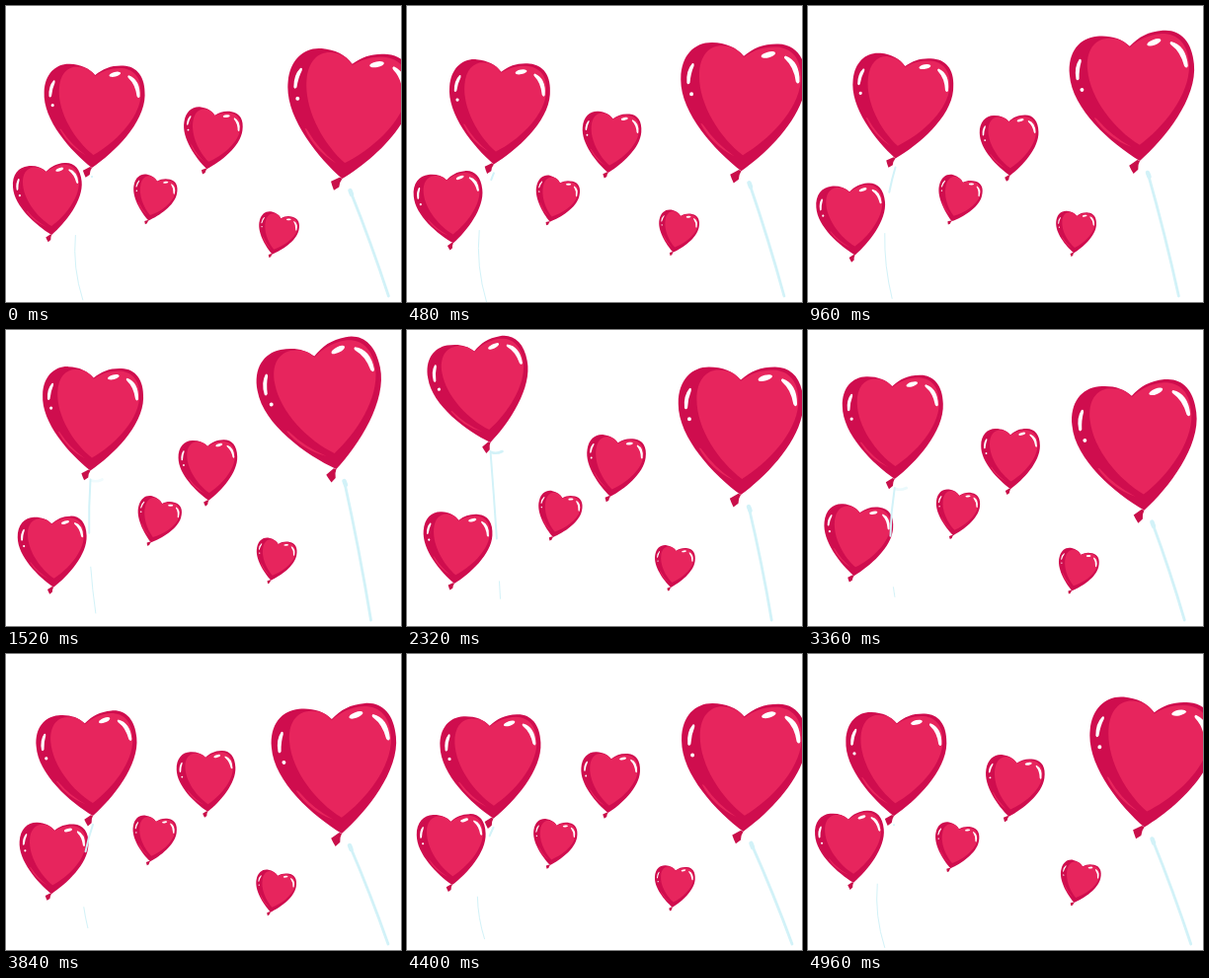
Recreate the animation shown at these times as an HTML page. Size 400 by 300 pixels, loop 5000 ms.

```html
<!DOCTYPE html>
<html lang="en">
<head>
<meta charset="utf-8">
<title>Heart balloons</title>
<style>
html, body { margin: 0; width: 100%; height: 100%; overflow: hidden; background: #fff; }
svg { display: block; width: 400px; height: 300px; }
.string { fill: none; stroke: #d2f2f8; stroke-linecap: round; }
</style>
</head>
<body>
<svg id="stage" viewBox="0 0 400 300">
  <defs>
    <g id="heart">
      <path fill="#c90f4a" d="M-2 -1L-9 3Q-8 6 -6 10L-2 7Q-2 3 0 0Z"/>
      <path fill="#cf0d4e" d="M0 0C-22 -16 -51.5 -47 -51 -75C-51 -94 -40 -104.5 -26 -104.5C-15 -104.5 -6 -101 0 -94C8 -101 16 -104.5 28 -104.5C42 -104.5 51 -94 51 -75C51.5 -47 22 -16 0 0Z"/>
      <path fill="#e7255d" d="M1 -13C-18 -27 -36 -54 -36 -78C-36 -94 -28 -102 -18 -102C-10 -102 -4 -99 0 -93C8 -99 16 -102 27 -102C40 -101 48 -92 47 -74C45 -50 22 -26 1 -13Z"/>
      <path fill="#e7255d" d="M-34 -38Q-25 -21 -6 -12Q-22 -23 -31 -36Q-33 -39 -34 -38Z"/>
      <g fill="#fff">
        <ellipse cx="20" cy="-95.5" rx="6" ry="2.3" transform="rotate(-16 20 -95.5)"/>
        <path d="M34 -95Q46 -91 46 -74Q45 -71 43 -74Q41 -86 34 -92Q32 -94 34 -95Z"/>
        <path d="M-42 -87Q-47 -81 -46 -71Q-45 -69 -43.5 -71Q-43 -79 -40.5 -85Q-40 -88 -42 -87Z"/>
        <circle cx="-42" cy="-62" r="1.6"/>
      </g>
    </g>
  </defs>
</svg>
<script>
const LOOP = 5000;

// Sine wave over the loop: mean, swing, peak in degrees, cycles per loop
const wave = (mean, swing, peak, cycles = 1) => t =>
  mean + swing * Math.cos((cycles * t / LOOP * 360 - peak) * Math.PI / 180);

// Smooth closed path through key points [ms, x, y, tilt]
function path(...keys) {
  const n = keys.length;
  const key = i => {
    const [ms, ...pose] = keys[(i + n) % n];
    return { ms: ms + LOOP * Math.floor(i / n), pose };
  };
  return t => {
    let i = n - 1;
    while (keys[i][0] > t) i--;
    const [p, a, b, q] = [i - 1, i, i + 1, i + 2].map(key);
    const span = b.ms - a.ms, u = (t - a.ms) / span;
    return a.pose.map((from, k) => {
      const step = b.pose[k] - from;
      const m0 = (b.pose[k] - p.pose[k]) / (b.ms - p.ms) * span;
      const m1 = (q.pose[k] - from) / (q.ms - a.ms) * span;
      return from + u * (m0 + u * (3 * step - 2 * m0 - m1 + u * (m0 + m1 - 2 * step)));
    });
  };
}

// Gentle drift: one wave each for x, y and tilt
const bob = (...waves) => t => waves.map(w => w(t));

const leftPath = path([0, 87, 164, 2], [960, 88.5, 154.5, 6], [1520, 85.5, 142.5, 2],
  [2320, 84.5, 114, -10], [2920, 87, 135, 1], [3840, 88, 164, -5]);
const rightPath = path([0, 340.5, 175, 5], [960, 336, 157, -5], [1520, 334.5, 141, -11],
  [2320, 338, 167, 0], [2920, 340.5, 180.5, -5.5], [3840, 340, 182, -5]);

const BALLOONS = [
  { size: 1, pose: leftPath },
  { size: 1.24, pose: rightPath },
  { size: .685, pose: bob(wave(47, 1.2, 130), t => wave(247.5, 13.5, 150)(t) - wave(0, 3.8, 0, 2)(t), wave(0, 6, 215)) },
  { size: .585, pose: bob(wave(204.7, 1.3, 170), wave(166.3, 6.5, 100), wave(3, 5.5, 0, 2)) },
  { size: .435, pose: bob(wave(146.2, 1.8, 180), wave(213.3, 5.5, 40), wave(12.3, 4, 90)) },
  { size: .4, pose: bob(wave(268.3, 1.4, 20), wave(257, 7.5, 225), wave(9.5, 5, 37, 3)) }
];

// Loose ends of the strings
const rightEnd = wave(379, 11, -40);
const leftMid = wave(80, 10, 172);
const leftEnd = bob(wave(86, 8.5, 165), wave(284, 16, 30));
// The left string shows only its upper share and its tail
const upperShare = wave(.3, .3, 180);
const tailStart = wave(.7, .25, 210);
const curlFade = wave(0, 1, 180);

const stage = document.getElementById('stage');

function set(el, attrs) {
  for (const name in attrs) el.setAttribute(name, attrs[name]);
}

function add(tag, attrs) {
  const el = document.createElementNS('http://www.w3.org/2000/svg', tag);
  set(el, attrs);
  return stage.appendChild(el);
}

const string = (width, attrs) => add('path', { class: 'string', 'stroke-width': width, ...attrs });

for (const b of BALLOONS) b.el = add('use', { href: '#heart' });
const rightLine = string(2.8), rightTop = string(4.5);
const upper = string(2, { pathLength: 1, 'stroke-linecap': 'butt' });
const tail = string(1, { pathLength: 1, 'stroke-linecap': 'butt' });
const curl = string(2.6);

function drawRightString(t) {
  const [tipX, tipY] = rightPath(t);
  const x = tipX + 8, y = tipY + 12, end = rightEnd(t);
  set(rightLine, { d: `M${x} ${y}Q${(x + end) / 2 + 2} ${(y + 294) / 2} ${end} 294` });
  set(rightTop, { d: `M${x} ${y}l1.5 4` });
}

function drawLeftString(t) {
  const [x, tipY] = leftPath(t), y = tipY + 9;
  const [endX, endY] = leftEnd(t);
  // Control point that carries the curve through the middle
  const d = `M${x} ${y}Q${2 * leftMid(t) - (x + endX) / 2} ${(y + endY) / 2} ${endX} ${endY}`;
  const start = tailStart(t);
  set(upper, { d, 'stroke-dasharray': `${upperShare(t)} 2` });
  set(tail, { d, 'stroke-dasharray': `0 ${start} ${1 - start} 2` });
  set(curl, { d: `M${x + 1} ${y + 1}q5 2 11 -1`, opacity: Math.max(0, curlFade(t)) });
}

function draw(t) {
  for (const { el, size, pose } of BALLOONS) {
    const [x, y, tilt] = pose(t);
    set(el, { transform: `translate(${x} ${y}) rotate(${tilt}) scale(${size})` });
  }
  drawRightString(t);
  drawLeftString(t);
}

function tick() {
  draw(performance.now() % LOOP);
  requestAnimationFrame(tick);
}
tick();
</script>
</body>
</html>
```
